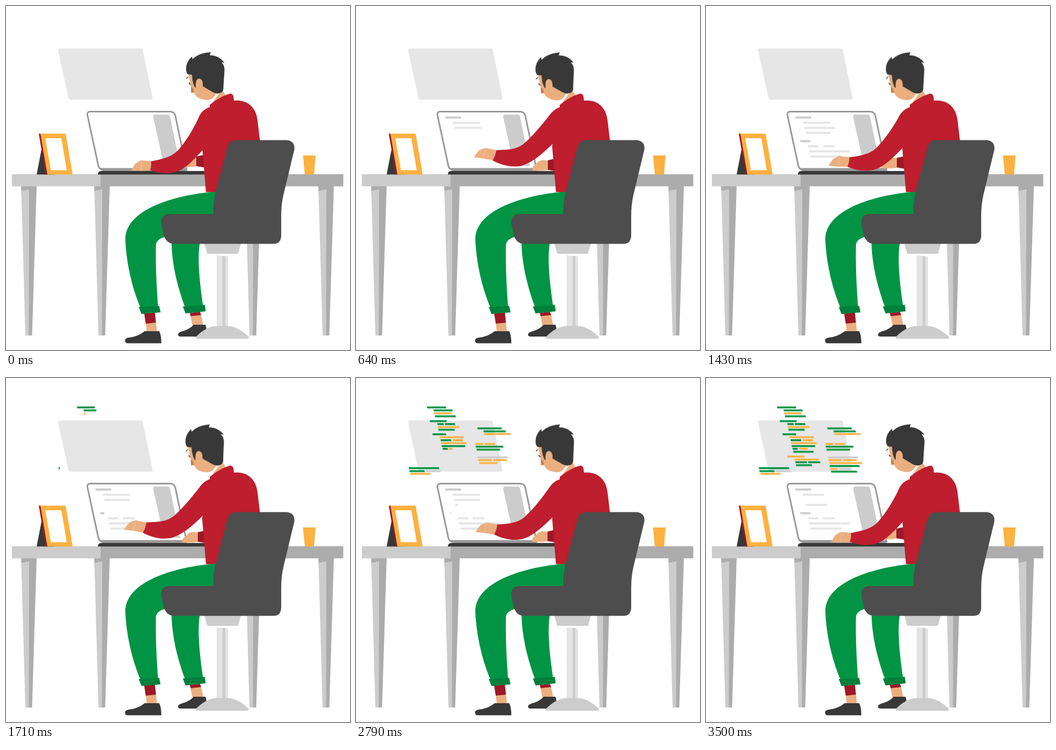
These frames come from a looping animation (640x640 px, 3570 ms). An HTML page:

```html
<!DOCTYPE html>
<html lang="en">
<head>
<meta charset="utf-8">
<title>Working at a desk</title>
<style>
  html, body { margin: 0; width: 100%; height: 100%; overflow: hidden; background: #fff; }
  svg { display: block; width: 100vw; height: 100vh; }
  .red { fill: #be1e2d; }
  .wine { fill: #9b1826; }
  .skin { fill: #ebae7f; }
  .dark { fill: #383838; }
  .green { fill: #009444; }
  .cuff { fill: #00803b; }
  .amber { fill: #fdb140; }
  .pale { fill: #e6e6e6; }
  .light { fill: #ccc; }
  .mid { fill: #acacac; }

  /* one key press: 595 ms down to up, then back */
  .sway { animation: 595ms cubic-bezier(.37, 0, .63, 1) infinite alternate; }
  #head { transform-origin: 395px 170px; animation-name: nod; }
  #farHand { animation-name: press; }
  #arm { animation-name: arm; }
  #hand { animation-name: hand; }
  #knuckle { animation-name: knuckle; }
  @keyframes nod { to { transform: rotate(-1.3deg); } }
  @keyframes press { from { transform: translate(-3px, -7px); } }
  @keyframes arm {
    from { d: path("M380,188 C366,192 360,202 357,211 C345,235 334,252 323,265 C312,279 296,284 270,289 Q271,298 268,305 C284,312 305,313 321,307 C336,301 350,285 366,268 L385,230 Z"); }
    to { d: path("M380,188 C368,192 364,198 357,207 C345,222 325,246 311,257 C297,267 285,267 261,268 Q259,279 254,287 C270,296 290,301 308,297 C330,290 346,275 364,258 L385,230 Z"); }
  }
  @keyframes hand {
    from { d: path("M233,306 L240,294 Q244,291 251,287 L272,289 L269,306 L250,307 Z"); }
    to { d: path("M219,281 L228,269 Q233,266 241,264 L262,268 L255,287 L240,284 Z"); }
  }
  @keyframes knuckle {
    from { d: path("M251.500,287 L252,306"); }
    to { d: path("M241,265 L236,283"); }
  }
  .bar { transform: scaleX(0); }
</style>
</head>
<body>
<svg viewBox="0 0 640 640" preserveAspectRatio="none">
  <defs>
    <g id="leg">
      <path class="mid" d="M28,335H57L48.500,613H42Z"/>
      <path class="light" d="M28.500,344L43,341L42.500,613H36Z"/>
    </g>
  </defs>

  <path class="pale" d="M101,79H250Q253.500,79 254.500,82L272.500,170Q273,174.500 269,174.500H121Q117,174.500 116,171L97,83Q97,79 101,79Z"/>
  <g id="board"></g>

  <!-- desk -->
  <use href="#leg"/>
  <use href="#leg" x="136"/>
  <use href="#leg" x="417"/>
  <use href="#leg" x="553"/>
  <path class="light" d="M11,313H176V335.500H11Z"/>
  <path class="mid" d="M176,313H627.500V335.500H176Z"/>

  <!-- picture frame and cup -->
  <path class="dark" d="M67,262L57,313.500H91L80,309Z"/>
  <path class="wine" d="M61,237.500H65L78,313.500H74Z"/>
  <path class="amber" d="M64,237.500H111L124,313.500H77Z"/>
  <path fill="#fff" d="M73,246H103L113,305.500H83.500Z"/>
  <path class="amber" d="M552.500,278H576L573,313.500H556Z"/>

  <!-- laptop -->
  <path fill="#fff" stroke="#999" stroke-width="3" d="M157,196.500H305Q313,196.500 315,204L336,304.500H181Q174,304.500 172,298L151.500,203Q150.500,196.500 157,196.500Z"/>
  <path fill="#999" d="M174,301.500H336V307H180Q176,306 174,301.500Z"/>
  <path class="light" d="M277,202H301Q304,202 305,205L324,297.500H294L274,207Q273.500,202 277,202Z"/>
  <g id="screen"></g>
  <path class="dark" d="M171,313.500Q171,307 177,307H375V313.500Z"/>

  <!-- far leg, near leg -->
  <path class="green" d="M308,438C308,480 320,525 333,560H367C361,520 355,470 361,438Z"/>
  <path class="skin" d="M343,576L363,574L367,595H347Z"/>
  <path class="wine" d="M342,571L361,569L363,575L343.500,577Z"/>
  <path class="cuff" d="M329,559L370,556L371.500,568L334,572Z"/>
  <path class="dark" d="M320,611Q320,607 332,604Q343,600 349,593H371Q374,600 372,604L358,615H325Q320,615 320,611Z"/>
  <path class="green" d="M395,345C340,348 222,370 222,435C224,480 235,525 250,561H283C280,520 278,480 279,443C282,433 292,430 300,429H400Z"/>
  <path class="skin" d="M260,589H279L281,607H262Z"/>
  <path class="wine" d="M257,572L277,570L279,589L260,591Z"/>
  <path class="cuff" d="M247,560L285,558L287.500,570L252,573Z"/>
  <path class="dark" d="M221.500,621Q222,617 235,616Q248,613 258,605H285Q289,612 289,627.500H226Q221,627 221.500,621Z"/>

  <!-- far hand -->
  <g id="farHand" class="sway">
    <path class="skin" d="M328,306.500L329,299L340,289L347,286.500L359,288V305L349,306.500Z"/>
    <path class="wine" d="M357,287L376,283V308L357,305Z"/>
  </g>

  <g id="head" class="sway">
    <path class="skin" d="M385,178L402,156L410,168L388,184Z"/>
    <path class="skin" d="M339,124L344,150L345,161H350Q355,174 374,175Q386,175 392,160L370,126Z"/>
    <path fill="#c17f4c" d="M344,150L344.500,161.500L350,161L348,153Z"/>
    <path fill="none" stroke="#383838" stroke-width="1.500" d="M335.500,135L339,131.500M340.500,142.500L343,146.500"/>
    <path class="dark" d="M338,127Q335,123 335,117Q335,104 346,94L347,99Q359,87 381,86L379,91.500Q397,92 406.500,106L401,104.500Q407,111 406.500,120L404.500,150Q405,157 402,160Q394,166 384,160L364,148L352,152Q347,145 346,128Z"/>
    <path class="skin" d="M353,152Q352,136 359,135Q367,136 366,149L362,156Z"/>
  </g>

  <path class="red" d="M379,189V184Q397,169 415,163.500Q422,161 423.500,170L424,176Q449,174 461,192Q466,199 468,213L473,255L420,300L390,346H372L365,262L370,200Z"/>
  <path id="hand" class="skin sway" d="M233,306L240,294Q244,291 251,287L272,289L269,306L250,307Z"/>
  <path id="knuckle" class="sway" fill="none" stroke="#f3c9a4" stroke-width=".8" d="M251.500,287L252,306"/>
  <path id="arm" class="red sway" d="M380,188C366,192 360,202 357,211C345,235 334,252 323,265C312,279 296,284 270,289Q271,298 268,305C284,312 305,313 321,307C336,301 350,285 366,268L385,230Z"/>

  <!-- chair -->
  <path fill="#e3e3e3" d="M392,464L413,466V598H392Z"/>
  <path class="light" d="M403,465H408V598H403Z"/>
  <path class="light" d="M369,442H437L431.500,461H374.500Z"/>
  <path class="light" d="M355,619Q350,617 356,613Q374,595.500 393,595.500H412Q430,595.500 449,613Q455,617 450,619Z"/>
  <path fill="#4d4d4d" d="M427,249.500H522Q538,251 536.500,267L516,352Q512,370 512,390V428Q511,442.500 498,442.500H312Q298,442 293,425L289,405Q288,388 303,387H386Q385,368 390,345L410,270Q414,249.500 427,249.500Z"/>
</svg>
<script>
  const LOOP = 3570;
  const TYPE = 140;
  const COLOR = { g: 'green', a: 'amber', l: 'light', p: 'pale' };

  // Slanted bar whose length follows pairs of [ms, share of full length].
  function bar(parent, x, y, w, color, h, keys) {
    const ns = 'http://www.w3.org/2000/svg';
    const g = document.createElementNS(ns, 'g');
    const p = document.createElementNS(ns, 'path');
    g.setAttribute('transform', `translate(${x} ${y})`);
    p.setAttribute('class', 'bar ' + COLOR[color]);
    p.setAttribute('d', `M0,0H${w - 0.8}L${w},${h}H.8Z`);
    g.append(p);
    document.getElementById(parent).append(g);
    const all = [[0, 0], ...keys, [LOOP, keys[keys.length - 1][1]]];
    p.animate(
      all.map(([t, s]) => ({ offset: t / LOOP, transform: `scaleX(${s})` })),
      { duration: LOOP, iterations: Infinity }
    );
  }

  // Row: x, y, then colour and width of each piece, typed one after the other.
  function column(rows, startOf, time = TYPE) {
    rows.forEach(([x, y, ...parts], i) => {
      const count = parts.length / 2;
      const step = time / count;
      let t = startOf(i);
      for (let k = 0; k < count; k++) {
        const w = parts[2 * k + 1];
        bar('board', x, y, w, parts[2 * k], 3.6, [[t, 0], [t + step, 1]]);
        x += w + 1.5;
        t += step;
      }
    });
  }

  column([
    [132, 53, 'g', 36], [144, 58.5, 'g', 36], [145, 64, 'a', 33], [146.5, 69.5, 'g', 39.5],
    [137, 78.5, 'g', 32], [151, 84, 'g', 12.5, 'g', 20], [152, 89.5, 'a', 41], [153, 94.5, 'g', 31],
    [142, 103, 'g', 26], [155, 108.5, 'a', 46], [157, 114, 'g', 20.5, 'a', 20.5],
    [158, 119.5, 'a', 48], [159, 125, 'g', 44.5], [160.5, 130, 'g', 10.5, 'a', 17],
    [162, 135.5, 'g', 38.5], [151, 144.5, 'a', 32.5], [164.5, 150, 'a', 45],
    [166, 155, 'g', 22, 'g', 23], [167, 160.5, 'g', 30.5]
  ], i => i < 1 ? 1580 : i < 9 ? 1533 + 82 * i : 1325 + 105 * i);

  column([
    [98, 166, 'g', 57], [99, 171.5, 'g', 29, 'l', 28], [101, 176.5, 'a', 38]
  ], i => 1705 + 150 * i, 180);

  column([
    [225.5, 92, 'g', 46], [237, 97.5, 'g', 42], [238, 102.5, 'a', 50],
    [221.5, 121, 'a', 16, 'a', 20.5], [222.5, 126, 'g', 52], [224, 131.5, 'g', 44.5],
    [226, 146, 'l', 57], [227.5, 151, 'a', 25.5, 'a', 26.5], [229, 156.5, 'a', 61.5],
    [230, 162, 'g', 56], [231, 167.5, 'a', 14.5, 'l', 22], [232.5, 172.5, 'g', 49]
  ], i => 1712 + 125 * i);

  // Screen text: each pair is the start of typing and the time it is wiped.
  function line(x, y, w, color, spans, time = 150) {
    const keys = [];
    for (const [from, wipe = LOOP] of spans) {
      keys.push([from, 0], [Math.min(from + time, LOOP), 1]);
      if (wipe < LOOP) keys.push([wipe, 1], [wipe, 0]);
    }
    bar('screen', x, y, w, color, 4, keys);
  }

  line(166, 205.5, 30, 'l', [[60, 900], [1200]]);
  line(180, 215.2, 51.5, 'p', [[200, 880], [970, 2150], [2330, 3300], [3385]]);
  line(182.5, 224.8, 58, 'p', [[510, 1540], [1585, 2120], [2170, 2620], [2665, 3440]]);
  line(185, 234, 47, 'p', [[935, 1640], [1800, 2700], [2775, 3330], [3370]]);
  line(175, 249.5, 19.5, 'l', [[700, 1600], [1650, 2740], [2780]]);
  line(189, 259, 20.5, 'p', [[930]], 130);
  line(217, 259, 22.5, 'p', [[1060]], 130);
  line(191, 268.5, 77, 'p', [[970]]);
  line(194, 278, 58, 'p', [[1160]]);
</script>
</body>
</html>
```
